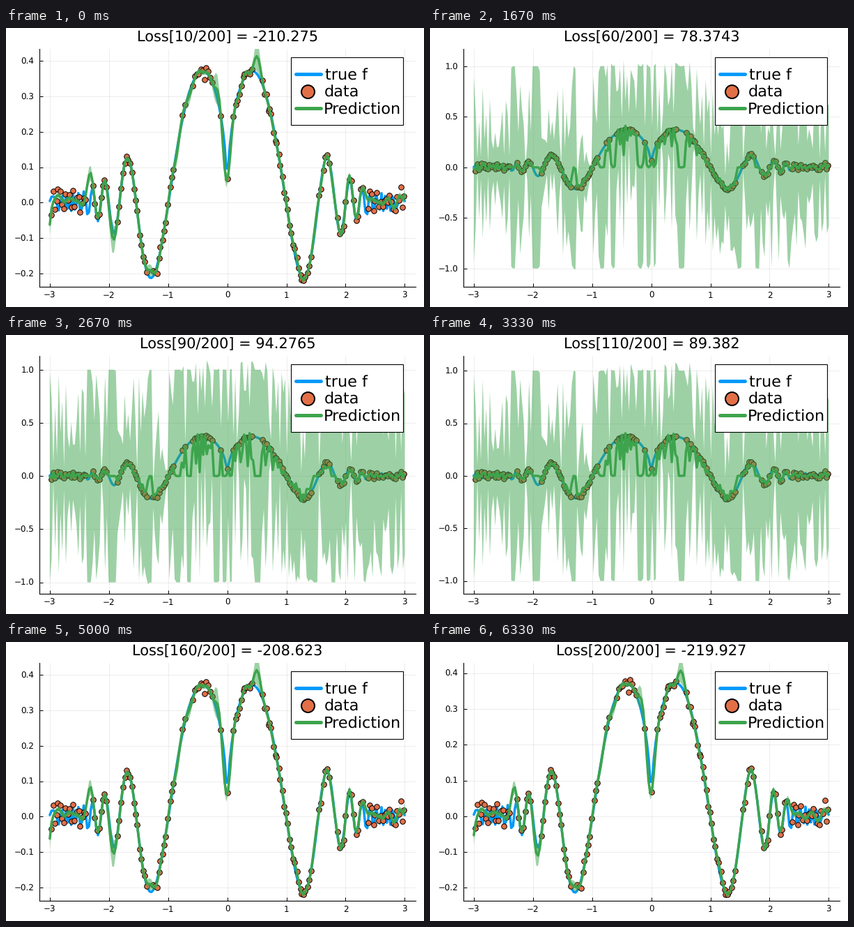
Write a matplotlib script that moves like this. It is 600 by 400 pixels and loops after 6660 ms.

```python
import numpy as np
import matplotlib.pyplot as plt
from matplotlib.animation import FuncAnimation
from matplotlib.patches import Rectangle
from matplotlib.ticker import MultipleLocator

plt.rcParams.update({"font.family": "DejaVu Sans", "text.hinting": "none"})

W, H, DPI = 600, 400, 100
PX = 72 / DPI  # points per pixel
BLUE, ORANGE, GREEN = "#009afa", "#e36f47", "#3da44d"
LEFT, RIGHT, TOP, BOTTOM = 47.6, 587.6, 29.6, 371.1
FRAMES = 20

# Optimiser path: frame, kernel length, loss, pixel row of zero, pixels per unit
KEYS = np.array([
    (0, .12, -210.275, 250.3, 507.5),
    (3, .12, -209.513, 250.3, 507.5),
    (4, .121, -208.947, 250.3, 508),
    (5, .015, 78.3743, 199.8, 145),
    (8, .011, 94.2765, 202.2, 152.4),
    (11, .013, 86.9347, 201.8, 150),
    (12, .125, -215.337, 249.4, 513),
    (15, .12, -208.623, 250.3, 507.5),
    (19, .13, -219.927, 249.8, 513),
]).T

# Stretches of x that hold samples; the spaces between them stay empty
RUNS = [(-2.98, -2.395), (-2.264, -2.04), (-1.86, -1.36), (-1.25, -.91),
        (-.756, -.709), (-.58, -.26), (-.108, -.108), (.01, .01),
        (.104, .422), (.598, 1.417), (1.552, 1.725), (1.86, 2),
        (2.07, 2.285), (2.38, 2.99)]
DENSITY = 34  # samples per unit of x
DATA_NOISE = .008
MODEL_NOISE = .012


def true_f(x):
    """Symmetric chirp whose amplitude falls as its frequency grows."""
    r = np.abs(x)
    phase = 2.25 * (np.exp(.417 * r ** 2) - 1) + 2 * np.sqrt(r)
    height = .02 + .375 * np.exp(-.32 * r ** 2 - .04 * r ** 4)
    return height * np.sin(phase)


def sample(rng):
    parts = []
    for a, b in RUNS:
        n = max(1, round(DENSITY * (b - a)))
        x = np.linspace(a, b, n)
        x[1:-1] += rng.uniform(-.4, .4, max(n - 2, 0)) / DENSITY
        parts.append(x)
    x = np.concatenate(parts)
    return x, true_f(x) + rng.normal(0, DATA_NOISE, len(x))


grid = np.linspace(-3, 3, 200)
data_x, data_y = sample(np.random.default_rng(4))


def posterior(length):
    """Mean and deviation of a Gaussian process with unit prior."""
    def kernel(a, b):
        return np.exp(-.5 * ((a[:, None] - b) / length) ** 2)

    gram = kernel(data_x, data_x) + MODEL_NOISE ** 2 * np.eye(len(data_x))
    cross = kernel(grid, data_x)
    mean = cross @ np.linalg.solve(gram, data_y)
    var = 1 - np.sum(cross * np.linalg.solve(gram, cross.T).T, axis=1)
    return mean, np.sqrt(np.maximum(var, 0))


fig = plt.figure(figsize=(W / DPI, H / DPI), dpi=DPI, facecolor="white")
ax = fig.add_axes([LEFT / W, 1 - BOTTOM / H,
                   (RIGHT - LEFT) / W, (BOTTOM - TOP) / H])
ax.set_xlim(-3.18, 3.18)
ax.xaxis.set_major_locator(MultipleLocator(1))
ax.set_axisbelow(True)
ax.grid(color="black", alpha=.1, lw=.7 * PX)
ax.spines[["top", "right"]].set_visible(False)
ax.spines[["left", "bottom"]].set_linewidth(1.1 * PX)
ax.tick_params(direction="in", length=5 * PX, width=PX, labelsize=11.92 * PX)
ax.tick_params(axis="x", pad=7 * PX)
ax.tick_params(axis="y", pad=7 * PX)

line_style = dict(lw=3.5 * PX, solid_capstyle="round", solid_joinstyle="round")
ax.plot(grid, true_f(grid), color=BLUE, zorder=2, **line_style)
ax.plot(data_x, data_y, "o", color=ORANGE, mec="black", ms=7.6 * PX,
        mew=PX, zorder=3)
band, = ax.fill([0, 1, 1], [0, 0, 1], color=GREEN, alpha=.5, lw=0, zorder=4)
curve, = ax.plot([], [], color=GREEN, zorder=5, **line_style)

# Overlay in pixel coordinates for the title and legend
top = fig.add_axes([0, 0, 1, 1])
top.set(xlim=(0, W), ylim=(H, 0))
top.axis("off")
title = top.text(318, 18.8, "", ha="center", va="baseline",
                 fontsize=20.85 * PX)
top.add_patch(Rectangle((409, 41.5), 160.8, 97.3, fc="white", ec="black",
                        lw=1.1 * PX))
for y, color in [(66, BLUE), (115, GREEN)]:
    top.plot([415.8, 451.8], [y, y], color=color, lw=5 * PX,
             solid_capstyle="round")
top.plot(433, 90.5, "o", color=ORANGE, mec="black", ms=19 * PX, mew=2 * PX)
for x, y, label in [(457.5, 66, "true f"), (457, 90.5, "data"),
                    (456, 115, "Prediction")]:
    top.text(x, y + 8.3, label, va="baseline", fontsize=22.35 * PX)


def update(k):
    length, loss, zero, scale = (np.interp(k, KEYS[0], row)
                                 for row in KEYS[1:])
    mean, dev = posterior(length)
    curve.set_data(grid, mean)
    band.set_xy(np.column_stack([
        np.concatenate([grid, grid[::-1]]),
        np.concatenate([mean + dev, (mean - dev)[::-1]])]))
    ax.set_ylim((zero - BOTTOM) / scale, (zero - TOP) / scale)
    ax.yaxis.set_major_locator(MultipleLocator(.5 if scale < 300 else .1))
    title.set_text(f"Loss[{10 * (k + 1)}/{10 * FRAMES}] = {loss:.6g}")
    return curve, band, title


anim = FuncAnimation(fig, update, frames=FRAMES, interval=333, repeat=True,
                     repeat_delay=0, blit=False)
plt.show()
```
